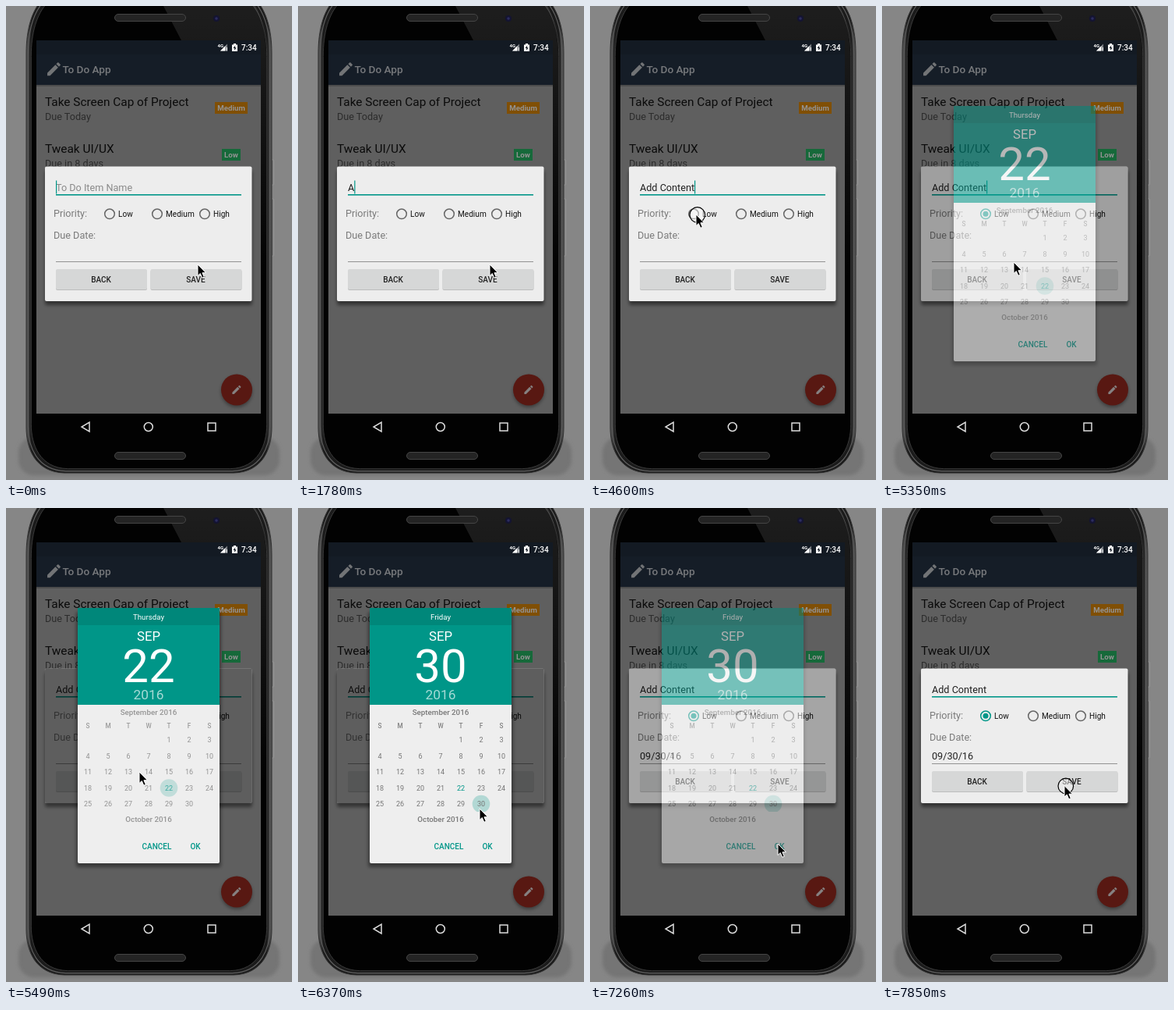
Write an HTML page that moves like this. It is 367x607 px and loops after 7990 ms.

```html
<!DOCTYPE html>
<html lang="en">
<head>
<meta charset="utf-8">
<title>To Do App</title>
<style>
  html, body { margin: 0; width: 100%; height: 100%; overflow: hidden; background: #868686; }
  svg { display: block; width: 367px; height: 607px; }
  text { font: 12.65px Roboto, "Noto Sans", sans-serif; white-space: pre; }
  .mid { text-anchor: middle; }
  .title { font-size: 15.4px; fill: #0b0b0b; }
  .due { fill: #2c2c2c; }
  .badge { font-size: 9.7px; font-weight: 700; fill: #929292; }
  .label { fill: #7b7b7b; }
  .opt { font-size: 10.1px; fill: #111; }
  .btn { font-size: 10px; font-weight: 500; fill: #222; }
  .month { font-size: 9.8px; font-weight: 500; fill: #777; }
  .day { font-size: 9px; fill: #757575; }
  .week { font-size: 8.2px; font-weight: 500; fill: #808080; }
  .teal { fill: #009688; }
</style>
</head>
<body>
<svg viewBox="0 0 367 607">
  <defs>
    <linearGradient id="rim" x1="0" x2="1">
      <stop offset="0" stop-color="#555"/><stop offset=".02" stop-color="#1b1b1b"/>
      <stop offset=".98" stop-color="#1b1b1b"/><stop offset="1" stop-color="#555"/>
    </linearGradient>
    <linearGradient id="gloss" x2="0" y2="1">
      <stop offset="0" stop-color="#fff" stop-opacity=".11"/><stop offset="1" stop-color="#fff" stop-opacity="0"/>
    </linearGradient>
    <filter id="soft" x="-20%" y="-20%" width="140%" height="140%"><feGaussianBlur stdDeviation="2"/></filter>
    <clipPath id="list"><rect x="92" y="285" width="182" height="104"/></clipPath>
    <path id="body" d="M26 60C26 30 33 5 48 -10H319C334 5 341 30 341 60V540C341 566 330 597 292 598H75C37 597 26 566 26 540Z"/>
    <path id="pencil" d="M3 17.25V21h3.75L17.81 9.94l-3.75-3.75L3 17.25zM20.71 7.04a1 1 0 0 0 0-1.41l-2.34-2.34a1 1 0 0 0-1.41 0l-1.83 1.83 3.75 3.75 1.83-1.83z"/>
  </defs>

  <!-- phone -->
  <rect width="367" height="607" fill="#868686"/>
  <rect x="16" y="552" width="335" height="49" rx="20" fill="#747474" filter="url(#soft)"/>
  <rect x="340" y="197" width="3.5" height="32" rx="1" fill="#777" stroke="#aaa" stroke-width=".6"/>
  <rect x="340" y="247" width="3.5" height="73" rx="1" fill="#777" stroke="#aaa" stroke-width=".6"/>
  <use href="#body" fill="url(#rim)" stroke="#333"/>
  <use href="#body" transform="translate(183.500 300) scale(.985 .992) translate(-183.500 -300)" fill="none" stroke="#606060" stroke-width="1.200"/>
  <use href="#body" transform="translate(183.500 300) scale(.96 .982) translate(-183.500 -300)" fill="#020202" stroke="#3c3c3c"/>
  <path d="M202 0L225 44H327V350H334V60Q332 20 320 0Z" fill="url(#gloss)"/>
  <g fill="#242424" stroke="#454545">
    <rect x="139.5" y="10.5" width="91" height="9" rx="4.5"/>
    <rect x="139.5" y="571.5" width="91" height="9" rx="4.5"/>
  </g>
  <circle cx="270" cy="16" r="4" fill="#141432"/>
  <circle cx="270" cy="16" r="1.8" fill="#2b2b60"/>

  <!-- app -->
  <rect x="39" y="44" width="288" height="478" fill="#5f5f5f"/>
  <rect x="39" y="44" width="288" height="57" fill="#151d27"/>
  <rect x="39" y="44" width="288" height="18" fill="#131a23"/>
  <rect x="39" y="101" width="288" height="2" fill="#000" opacity=".2"/>
  <g fill="#fff">
    <text x="271.5" y="53" style="font-size:6px;font-weight:700">4G</text>
    <path d="M275 57.5h9v-9z" opacity=".45"/>
    <path d="M275 57.5h6.5v-6.5z"/>
    <path d="M283 53h1v4.500h-1z"/>
    <path d="M290 49.500h2v-1.500h3v1.500h2v8.500h-7z"/>
    <path d="M294.200 50.500l-2.700 3.500h1.700v3l2.400-3.700h-1.600z" fill="#131a23"/>
    <text x="302" y="56.500" style="font-size:10px;font-weight:500">7:34</text>
  </g>
  <use href="#pencil" transform="translate(50.200 69.500) scale(.94)" fill="#727476"/>
  <text x="72.500" y="86" fill="#77797c" style="font-size:13.600px;font-weight:500">To Do App</text>
  <text class="title" x="50" y="128">Take Screen Cap of Project</text>
  <text class="due" x="50" y="145.700">Due Today</text>
  <text class="title" x="50" y="188">Tweak UI/UX</text>
  <text class="due" x="50" y="205.700">Due in 8 days</text>
  <rect x="268" y="123" width="42" height="15" fill="#804f05"/>
  <text class="badge mid" x="289" y="134">Medium</text>
  <rect x="277" y="183" width="24" height="15" fill="#16693a"/>
  <text class="badge mid" x="289" y="194">Low</text>
  <circle cx="296" cy="494" r="20" opacity=".35" filter="url(#soft)"/>
  <circle cx="296" cy="491.500" r="20" fill="#581812"/>
  <use href="#pencil" transform="translate(288.500 484) scale(.62)" fill="#858080"/>
  <g fill="none" stroke="#ddd" stroke-width="1.500">
    <path d="M107 533v12l-10-6z"/>
    <circle cx="182.800" cy="539" r="5.500"/>
    <rect x="259" y="534" width="10" height="10"/>
  </g>

  <!-- form -->
  <rect x="50" y="211" width="266" height="172" rx="3" opacity=".45" filter="url(#soft)"/>
  <rect x="50" y="205.500" width="265.500" height="172.500" rx="2" fill="#ededed"/>
  <text id="name" x="64" y="236.700"></text>
  <rect id="caret" y="223.500" width="1.200" height="17" class="teal"/>
  <rect x="64" y="241" width="238" height="1.600" class="teal"/>
  <text class="label" x="61" y="270">Priority:</text>
  <g fill="none" stroke="#666" stroke-width="1.500">
    <circle id="ring" cx="133" cy="266.300" r="6.300"/>
    <circle cx="194" cy="266.300" r="6.300"/>
    <circle cx="255" cy="266.300" r="6.300"/>
  </g>
  <circle id="dot" cx="133" cy="266.300" r="3.500" class="teal"/>
  <text class="opt" x="144" y="270">Low</text>
  <text class="opt" x="205" y="270">Medium</text>
  <text class="opt" x="266" y="270">High</text>
  <text class="label" x="61" y="297.700">Due Date:</text>
  <text id="date" x="64" y="321.700" fill="#222"></text>
  <rect x="64" y="327" width="238" height="1" fill="#929292"/>
  <g fill="#bcbcbc"><rect x="64" y="338" width="117" height="26" rx="2"/><rect x="185.500" y="338" width="117" height="26" rx="2"/></g>
  <g fill="#d6d7d7"><rect x="64" y="337" width="117" height="26" rx="2"/><rect x="185.500" y="337" width="117" height="26" rx="2"/></g>
  <text class="btn mid" x="122" y="353.700">BACK</text>
  <text class="btn mid" x="243.500" y="353.700">SAVE</text>

  <!-- date picker -->
  <g id="picker">
    <rect x="50" y="205.500" width="265.500" height="172.500" rx="2" opacity=".6"/>
    <rect x="90" y="133" width="186" height="327" rx="3" opacity=".4" filter="url(#soft)"/>
    <rect x="92" y="128" width="182" height="327" rx="2" fill="#eee"/>
    <rect x="92" y="128" width="182" height="124" class="teal"/>
    <rect x="92" y="128" width="182" height="22" fill="#00877a"/>
    <g fill="#fff" class="mid">
      <text id="weekday" x="183" y="142.500" style="font-size:9.700px"></text>
      <text x="183" y="170" style="font-size:16.700px">SEP</text>
      <text id="big" x="183" y="223" style="font-size:60px"></text>
      <text x="183" y="245" style="font-size:17.300px" opacity=".65">2016</text>
    </g>
    <g id="cal" class="mid">
      <text class="month" x="183" y="264.500">September 2016</text>
      <circle id="mark" r="11.300" fill="#009688" fill-opacity=".25" clip-path="url(#list)"/>
      <text class="month" x="183" y="401.500">October 2016</text>
    </g>
    <text class="btn mid" x="193.500" y="436.500" style="fill:#009688">CANCEL</text>
    <text class="btn mid" x="243" y="436.500" style="fill:#009688">OK</text>
  </g>

  <!-- pointer -->
  <g id="mouse">
    <circle id="click" cx="1.800" cy=".5" r="9.800" fill="#fff" fill-opacity=".45" stroke="#000" stroke-width="1.200"/>
    <path d="M0 0V14.500L3.300 11.500L5.800 17.300L8.300 16.200L5.900 10.700H10.500Z" stroke="#fff" stroke-width="1" stroke-linejoin="round"/>
  </g>
</svg>
<script>
const LOOP = 7990;
const $ = id => document.getElementById(id);

// Each track holds [start ms, value...]; values hold until the next step.
const typed = [[0, ''], [1780, 'A'], [2230, 'Ad'], [2380, 'Add'], [2530, 'Add '],
  [2830, 'Add C'], [2980, 'Add Co'], [3130, 'Add Cont'], [3270, 'Add Conte'], [3420, 'Add Content']];
const caretOn = [[0, 1], [600, 0], [1040, 1], [1490, 0], [1780, 1], [3870, 0], [4310, 1],
  [4900, 0], [5340, 1], [7260, 0]];
const pointer = [[0, 246, 331], [3720, 241, 327], [3870, 217, 307], [4010, 183, 286], [4160, 153, 272],
  [4310, 139, 268], [4460, 136, 267], [4900, 142, 279], [5050, 160, 307], [5200, 168, 321],
  [5340, 169, 328], [5490, 171, 338], [5640, 177, 347], [5780, 192, 369], [5930, 214, 399],
  [6080, 233, 385], [6520, 234, 391], [6670, 237, 408], [6820, 240, 426], [6960, 241, 433],
  [7260, 241, 430], [7410, 243, 396], [7550, 240, 376], [7700, 235, 360], [7850, 234, 355.5]];
const clicking = [[0, 0], [4600, 1], [4750, 0], [5200, 1], [5340, 0], [6080, 1], [6370, 0],
  [7110, 1], [7260, 0], [7850, 1]];
const pickerAlpha = [[0, 0], [5340, .55], [5490, 1], [7260, .5], [7410, 0]];
const calAlpha = [[0, .75], [5640, 1]];

const at = (track, t) => track.findLast(step => step[0] <= t).slice(1);

function addText(str, x, y, cls) {
  const el = document.createElementNS('http://www.w3.org/2000/svg', 'text');
  el.textContent = str;
  el.setAttribute('x', x);
  el.setAttribute('y', y);
  el.setAttribute('class', cls);
  $('cal').append(el);
  return el;
}

// September 1st falls on a Thursday (column 4).
const cell = day => {
  const i = day + 3;
  return [105 + 26 * (i % 7), 297 + 20.5 * Math.floor(i / 7)];
};
[...'SMTWTFS'].forEach((d, i) => addText(d, 105 + 26 * i, 281.5, 'week'));
for (let d = 1; d <= 30; d++) {
  const [x, y] = cell(d);
  const el = addText(d, x, y + 3.2, 'day');
  if (d === 22) el.style.fill = '#009688';
}

const set = (id, attrs) => {
  for (const k in attrs) $(id).setAttribute(k, attrs[k]);
};

function draw(t) {
  const [str] = at(typed, t);
  const name = $('name');
  name.textContent = str || 'To Do Item Name';
  set('name', { fill: str ? '#222' : '#8a8a8a' });
  set('caret', { x: 64 + (str ? name.getComputedTextLength() : 0), opacity: at(caretOn, t)[0] });

  const low = t >= 4750;
  set('ring', { stroke: low ? '#009688' : '#666' });
  set('dot', { opacity: +low });
  $('date').textContent = t >= 7110 ? '09/30/16' : '';

  const day = t >= 6370 ? 30 : 22;
  const [cx, cy] = cell(day);
  $('weekday').textContent = day === 30 ? 'Friday' : 'Thursday';
  $('big').textContent = day;
  set('mark', { cx, cy });
  set('picker', { opacity: at(pickerAlpha, t)[0] });
  set('cal', { opacity: at(calAlpha, t)[0] });

  set('mouse', { transform: `translate(${at(pointer, t)})` });
  set('click', { opacity: at(clicking, t)[0] });
}

const start = performance.now();
function tick() {
  draw((performance.now() - start) % LOOP);
  requestAnimationFrame(tick);
}
tick();
</script>
</body>
</html>
```
